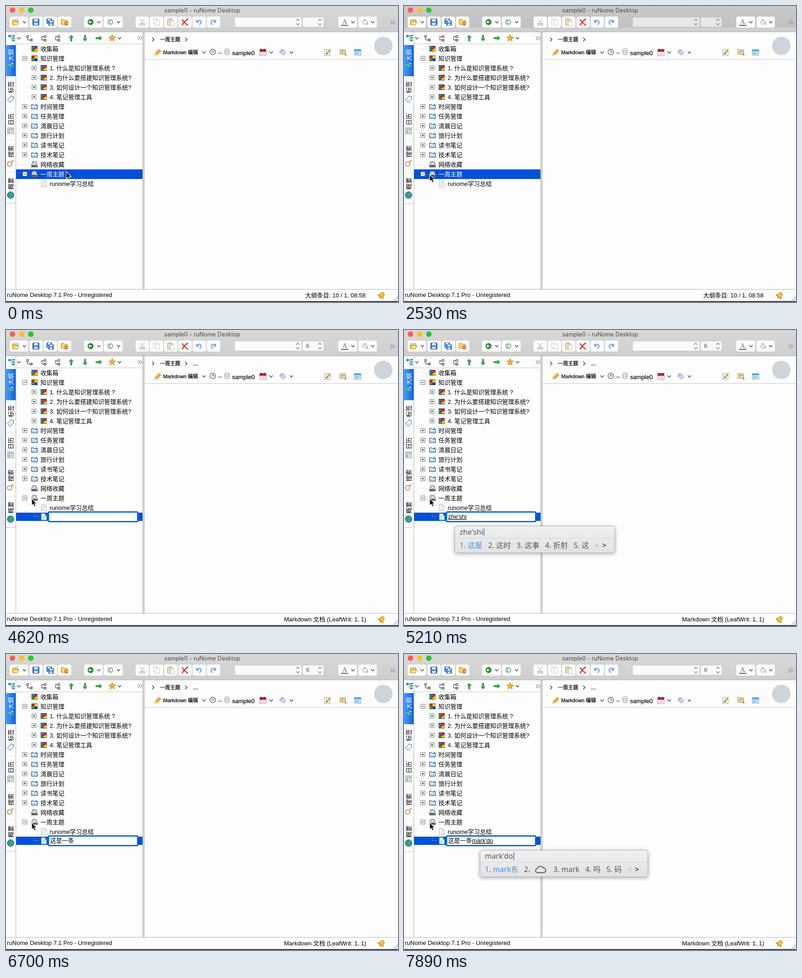
Animation, 853 px wide and 645 px high, one loop 8 s. Source, as an HTML page:

```html
<!DOCTYPE html>
<html lang="zh-CN">
<head>
<meta charset="utf-8">
<style>
html, body { margin: 0; width: 100%; height: 100%; overflow: hidden; background: #fdfdfd; }
svg { display: block; }
#stage { position: absolute; left: 0; top: 0; font: 13px "Liberation Sans", "Noto Sans CJK SC", "Noto Sans CJK", sans-serif; }
text { white-space: pre; }
.small { font-size: 11px; stroke: #000; stroke-width: .25px; }
#popup {
  position: absolute; top: 427px; height: 57px; padding: 0 18px 0 10px;
  border: 1px solid #b4b4b4; border-radius: 5px; background: linear-gradient(#f0f0f0, #e2e2e2);
  box-shadow: 0 2px 8px rgba(0,0,0,.32); white-space: pre; color: #555;
  font: 16px "Noto Sans", "Noto Sans CJK SC", "Noto Sans CJK", sans-serif;
}
#spelling { height: 25px; line-height: 25px; margin: 0 -18px 0 -10px; padding-left: 10px; border-bottom: 1px solid #d6d6d6; }
#spelling::after { content: ""; display: inline-block; width: 1.5px; height: 17px; margin-left: 1px; background: #4a97e8; vertical-align: -3px; }
#choices { display: flex; gap: 12.4px; height: 30px; line-height: 30px; }
#choices span:first-child { color: #3e90e2; }
#choices svg { display: inline-block; vertical-align: -4px; }
#choices .prev { color: #aaa; margin-right: -5.4px; }
#choices .next { color: #111; }
</style>
</head>
<body>
<svg id="stage" width="853" height="645" viewBox="0 0 853 645"></svg>
<div id="popup"><div id="spelling"></div><div id="choices"></div></div>
<script>
const LOOP = 8000;
const BLUE = '#0450d9';

const at = (x, y, inner) => `<g transform="translate(${x} ${y})">${inner}</g>`;
const rect = (x, y, w, h, fill, more = '') => `<rect x="${x}" y="${y}" width="${w}" height="${h}" fill="${fill}" ${more}/>`;
const circle = (x, y, r, fill, more = '') => `<circle cx="${x}" cy="${y}" r="${r}" fill="${fill}" ${more}/>`;
const shape = (d, fill, more = '') => `<path d="${d}" fill="${fill}" ${more}/>`;
const line = (d, color, width = 1, more = '') =>
  `<path d="${d}" fill="none" stroke="${color}" stroke-width="${width}" ${more}/>`;
const text = (x, y, str, more = '') => `<text x="${x}" y="${y}" ${more}>${str}</text>`;
const down = (x, y, color = '#555') => line(`M${x - 3.5} ${y - 2}l3.5 4 3.5-4`, color, 1.5);
const right = (x, y) => line(`M${x - 2} ${y - 4}l4 4-4 4`, '#444', 1.5);
const more = (x, y) => line(`M${x} ${y - 4}l4 4-4 4M${x + 5} ${y - 4}l4 4-4 4`, '#888', 1.2);
const button = (x, w) => rect(x, 23, w, 24, '#fcfcfc', 'rx="4"');

// Icons, each centred on 0,0
const icon = {
  quad: at(0, 0, rect(-6.5, -6, 13, 12, '#123') + rect(-6, -5, 6, 5, '#18f') + rect(0, -5, 6, 5, '#e22')
    + rect(-6, 0, 6, 5, '#1a2') + rect(0, 0, 6, 5, '#fd1') + rect(-3, -2, 5, 4, '#d11')),
  bright: rect(-6.5, -6, 13, 12, '#222') + rect(-6, -5, 6, 5, '#f11') + rect(0, -5, 6, 5, '#fe1')
    + rect(-6, 0, 6, 5, '#1b2') + rect(0, 0, 6, 5, '#23f'),
  folder: shape('M-6.5 5.5v-10h4l2 2h7v8z', '#b7d3f3', 'stroke="#24445f"') + line('M-6-.5h12', '#fff', 1.5)
    + line('M4-6v5M1.5-3.5h5M2.5-5l3 3m0-3l-3 3', '#1695dd', .9),
  disk: shape('M-4.5-6h8l3 8v4h-13v-4z', '#d8dbe0', 'stroke="#6b6f76"') + rect(-6, 2, 12, 3.5, '#4b5057')
    + circle(0, -2, 2.7, '#f4f6f8', 'stroke="#8a9099"') + circle(4, 4, .8, '#8f8'),
  page: shape('M-5-7h7l4 4v10h-11z', '#fff', 'stroke="#a9a9a9"') + line('M2-7v4h4M-3-2h6M-3 1h6M-3 4h6', '#bbb', .9),
  newPage: shape('M-5-7h7l4 4v10h-11z', '#f4fbff', 'stroke="#7aa9da"') + line('M-3-1h6M-3 2h6M-3 5h4', '#7ab', .9)
    + line('M4-6v5M1.5-3.5h5', '#1aa6c8', 1.2),
  open: shape('M-7 6v-11h5l1.5 2h5v3', '#ffd65c', 'stroke="#b98208"') + shape('M-7 6l3-7h11l-3 7z', '#ffe48b', 'stroke="#b98208"')
    + rect(0, -6, 5, 4, '#cfe3fa', 'stroke="#68a" stroke-width=".7"'),
  save: rect(-7, -7, 14, 14, '#3d7fdc', 'rx="1.5" stroke="#1c4c9e"') + rect(-4, -6.5, 8, 5, '#eef5ff') + rect(-4, 1.5, 8, 5, '#cfe2fb'),
  removeFolder: shape('M-7 5v-11h5l1.5 2h7v9z', '#ffd65c', 'stroke="#b98208"') + circle(4, 3, 4, '#e8541f') + rect(1.5, 2.2, 5, 1.6, '#fff'),
  calendar: rect(-7, -6, 14, 13, '#fff', 'stroke="#999"') + rect(-7, -7, 14, 6, '#c4252f')
    + line('M-4-8v4M4-8v4', '#511', 1.2) + line('M-5 1.5h10M-5 4.5h10', '#c66', 1.2, 'stroke-dasharray="2 1"'),
  tag: shape('M-6-2l3-4h4l6 7-5 5-8-6z', '#d9d4f5', 'stroke="#8d80c4"') + circle(-2, -3, 1.2, '#fff', 'stroke="#8d80c4"'),
  pencil: shape('M-7 6l2-5 8-8 4 4-8 8z', '#f6a526', 'stroke="#9b5a0c" stroke-width=".8"') + shape('M-7 6l2-5 3 4z', '#f6dfb4')
    + line('M-4 2L4-6', '#ffd88a', 1.2),
  clock: circle(0, 0, 6.2, '#e9edf3', 'stroke="#79808c" stroke-width="1.6"') + line('M0-4v4h3.5', '#445', 1.2),
  database: shape('M-5-5v10q5 3 10 0v-10z', '#e4e6e8', 'stroke="#92979b"')
    + '<ellipse cy="-5" rx="5" ry="2" fill="#fafafa" stroke="#92979b"/>' + line('M-5 0q5 3 10 0', '#b0b4b8'),
  edit: rect(-7, -6, 12, 13, '#fff', 'stroke="#999"') + line('M-5-3h7M-5 0h4M-5 3h8', '#9bb', .9)
    + line('M-2 3l8-9', '#e9971e', 3) + shape('M-4 5l1-4 3 2.5z', '#553'),
  find: rect(-7, -6, 13, 10, '#ffe092', 'stroke="#c79323"') + rect(-5, -4, 9, 4, '#9cc6f3')
    + circle(2, 1, 3.6, '#d6ebff', 'stroke="#d08a28" stroke-width="1.3"') + line('M4.5 4l3 3', '#c5711c', 2),
  pane: rect(-7, -6, 14, 12, '#f6fbff', 'stroke="#4292d3"') + rect(-7, -6, 14, 3.5, '#47a0e7')
    + line('M-5 0h5M-5 3h8', '#58a', 1.3) + rect(2, -1, 3, 2, '#4ac35b'),
  bell: at(0, 0, `<g transform="rotate(38)">${shape('M-7 5q3-2 3-7a4 4 0 0 1 8 0q0 5 3 7z', '#ffc52e', 'stroke="#a9700a"')
    + circle(0, 6, 2, '#d98a10')}</g>`),
  globe: circle(0, 0, 7.3, '#3c95dd', 'stroke="#165083"') + shape('M-6-2q3-5 6-4l1 4-4 3 1 5q-4-2-4-8zM2 1l4-3q2 5-3 7z', '#35a443')
};
const put = (name, x, y) => at(x, y, icon[name]);

function titleBar() {
  const undo = 'M-5-5v5h5M-5 0q4-6 8-3 4 4-2 9';
  const curve = (x, flip) => `<g transform="translate(${x} 35) scale(${flip} 1)">${line(undo, '#6f9fe0', 2.2)}</g>`;
  const round = (x, color, way) => circle(x, 35, 6.5, color) + line(`M${x + 3.5 * way} 35h${-7 * way}m${3 * way}-3l${-3 * way} 3 ${3 * way} 3`, '#fff', 1.6);
  const stepper = x => line(`M${x - 3.5} 32l3.5-3.5 3.5 3.5M${x - 3.5} 38l3.5 3.5 3.5-3.5`, '#777', 1.3);
  return rect(0, 0, 853, 57, 'url(#bar)')
    + rect(498, 25, 145, 20, '#fafafa', 'rx="3"') + rect(646, 25, 45, 20, '#fafafa', 'rx="3"')
    + rect(0, 0, 853, 47, '#000', 'id="dim" opacity=".07"')
    + stepper(635) + stepper(683)
    + circle(14, 9, 6, '#fc5b57') + circle(34, 9, 6, '#fdbc2e') + circle(54, 9, 6, '#28c231')
    + text(427, 14, 'sample0 - ruNome Desktop', 'text-anchor="middle" fill="#4a4a4a" style="font:12.7px Inter,sans-serif"')
    + [[8, 40], [51, 29], [82, 29], [113, 29], [170, 41], [213, 41], [282, 29], [313, 29], [344, 29],
      [375, 29], [406, 29], [437, 29], [723, 41], [767, 40]].map(b => button(...b)).join('')
    + put('open', 21, 35) + down(40, 35) + put('save', 65, 35)
    + `<g transform="translate(94 33) scale(.78)">${icon.save}</g><g transform="translate(98 37) scale(.78)">${icon.save}</g>`
    + put('removeFolder', 127, 35)
    + round(184, '#218a2a', 1) + down(202, 35) + round(227, '#9ac79c', -1) + down(245, 35)
    + line('M292 28l6 10M301 28l-6 10', '#a8bfdc', 1.4) + circle(293, 40, 2.3, 'none', 'stroke="#9db8dc" stroke-width="1.4"')
    + circle(300, 40, 2.3, 'none', 'stroke="#9db8dc" stroke-width="1.4"')
    + rect(321, 28, 8, 11, '#fff', 'stroke="#c4c4c4"') + rect(326, 31, 8, 11, '#fff', 'stroke="#c4c4c4"')
    + rect(351, 29, 12, 13, '#efd9b0', 'rx="1" stroke="#c5a77b"') + rect(354, 27, 6, 3, '#bbb') + rect(358, 33, 8, 10, '#fff', 'stroke="#bbb"')
    + line('M383 29q5 8 13 13M396 28q-8 5-13 14', '#e02020', 2.3)
    + curve(420, 1) + curve(451, -1)
    + text(737, 39, 'A', 'text-anchor="middle" fill="#777" style="font:15px Liberation Serif,serif"') + rect(729, 41, 16, 2.5, '#777') + down(755, 35)
    + shape('M775 35l6-6 6 6-6 6z', '#eee', 'stroke="#999"') + line('M779 28l3 5', '#999') + shape('M786 36q4 4 1 5-3-1-1-5z', '#9ab') + down(798, 35)
    + more(837, 36) + rect(0, 56, 853, 1, '#b0b0b0');
}

function sideTabs() {
  const label = (y, str, fill) => `<text transform="translate(14.5 ${y}) rotate(-90)" text-anchor="middle" fill="${fill}">${str}</text>`;
  return line('M21.5 57V617', '#b5b5b5') + line('M0 430.5h17q4 0 4-4', '#c4c4c4')
    + [222, 292, 362].map(y => line(`M0 ${y}.5h21`, '#e6e6e6')).join('')
    + rect(0, 85, 21, 68, 'url(#tab)')
    + ['大纲', '标签', '日历', '搜索', '概要'].map((s, i) => label(107 + 70 * i, s, i ? '#000' : '#fff')).join('')
    + rect(3, 126, 4, 4, '#3ad13a') + rect(11, 124, 5, 3, '#8df') + rect(11, 130, 5, 3, '#3ad13a') + line('M7 128h3v4', '#cef')
    + shape('M3 204l8-8 5 1 1 5-8 8z', '#e8f4ff', 'stroke="#456"')
    + rect(3.5, 265.5, 13, 13, '#fff', 'stroke="#4b8ed0"') + rect(5, 267, 4, 4, '#f2a43a') + rect(10, 267, 5, 4, '#7ab7ee')
    + rect(5, 272, 4, 5, '#7ab7ee') + rect(10, 272, 5, 5, '#ffd36b')
    + circle(8, 344, 5, '#f2f8ff', 'stroke="#c77b2a" stroke-width="1.5"') + line('M12 340l4-4', '#d98725', 2.4)
    + put('globe', 10, 412);
}

function treeTools() {
  const branch = x => line(`M${x + 3} 66v8h5M${x + 3} 67h5`, '#222')
    + rect(x + 8, 64.5, 4, 4, '#fff', 'stroke="#222"') + rect(x + 8, 72.5, 4, 4, '#9e9', 'stroke="#222"');
  const arrow = (x, angle) => `<g transform="translate(${x} 70) rotate(${angle})">${shape('M0-6.5l4.5 5h-3v8h-3v-8h-3z', '#2fb344', 'stroke="#137a28" stroke-width=".8"')}</g>`;
  const star = Array.from({ length: 10 }, (_, i) => {
    const r = i % 2 ? 3.4 : 7.8, a = i * Math.PI / 5;
    return `${231 + r * Math.sin(a)},${70 - r * Math.cos(a)}`;
  }).join(' ');
  return rect(5, 63, 5, 5, '#2d8ae2') + line('M10 65h4M12 65v10h2M12 70h2', '#678')
    + [63, 68, 73].map((y, i) => rect(14, y, 5, 3.5, i % 2 ? '#31b34a' : '#2d8ae2')).join('') + down(28, 70)
    + rect(45, 64.5, 4, 4, '#fff', 'stroke="#222"') + line('M47 69v5h6', '#222') + rect(53, 72, 4, 4, '#9e9', 'stroke="#222"')
    + branch(75) + branch(105) + arrow(142, 0) + arrow(172, 180) + arrow(202, 90)
    + `<polygon points="${star}" fill="#fcb51d" stroke="#c77b08"/>` + down(247, 70) + more(287, 70)
    + rect(22, 82, 275, 1, '#c8c8c8');
}

const ROWS = [
  [0, 'quad', '', '收集箱'], [0, 'bright', '-', '知识管理'],
  [1, 'quad', '+', '1. 什么是知识管理系统 ?'], [1, 'quad', '+', '2. 为什么要搭建知识管理系统?'],
  [1, 'quad', '+', '3. 如何设计一个知识管理系统?'], [1, 'quad', '+', '4. 笔记管理工具'],
  ...['时间管理', '任务管理', '清晨日记', '旅行计划', '读书笔记', '技术笔记'].map(s => [0, 'folder', '+', s]),
  [0, 'disk', '', '网络收藏'], [0, 'disk', '-', '一周主题'], [1, 'page', '', 'runome学习总结']
];

function tree() {
  const dots = (x, y, n, color) => line(`M${x} ${y}h${n}`, color, 1, 'stroke-dasharray="1 2"');
  return rect(22, 356, 275, 21, BLUE, 'id="rowMark"') + ROWS.map(([level, kind, box, label], i) => {
    const x = 41 + 20 * level, y = 93 + 21 * i;
    const expander = box
      ? rect(x - 4.5, y - 4.5, 9, 9, '#fff', 'stroke="#777"') + line(`M${x - 2.5} ${y}h5` + (box == '+' ? `M${x} ${y - 2.5}v5` : ''), '#111')
        + dots(x + 6, y + .5, 5, '#bbb')
      : dots(x, y + .5, 12, '#bbb');
    return expander + put(kind, x + 21, y) + text(x + 34, y + 5, label, i == 13 ? 'id="topic"' : '');
  }).join('')
    + `<g id="newRow">${rect(22, 398, 275, 18, BLUE)}${line('M61.5 399v8M61 406.5h11', '#cde', 1, 'stroke-dasharray="1 2"')}
      ${put('newPage', 82, 407)}${rect(92.5, 396.5, 194, 21, '#fff', 'rx="2" stroke="#0f69ea" stroke-width="3"')}
      <text x="96" y="411"><tspan id="typed"></tspan><tspan id="raw" text-decoration="underline"></tspan></text>
      ${rect(96, 400, 1, 14, '#000', 'id="caret"')}</g>`;
}

function content() {
  return rect(297, 57, 5, 560, '#d2d2d2') + rect(297, 57, 1, 560, '#b9b9b9')
    + right(320, 73) + text(335, 77, '一周主题', 'class="small"') + right(392, 73) + text(406.5, 77, '....', 'id="crumb" class="small"')
    + put('pencil', 330, 101) + text(342, 105, 'Markdown 编辑', 'class="small"') + down(431, 101)
    + put('clock', 450, 100) + text(461.5, 106, '--') + put('database', 481, 100) + text(492, 107, 'sample0', 'stroke="#000" stroke-width=".2"')
    + put('calendar', 559, 101) + down(577, 101) + put('tag', 602, 101) + down(621, 101)
    + put('edit', 700, 101) + put('find', 733, 101) + put('pane', 765, 101)
    + circle(821, 87, 20, '#cbd5db') + rect(302, 116, 551, 1, '#c6c6c6');
}

function statusBar() {
  return rect(0, 617, 853, 1, '#b5b5b5') + text(2, 634, 'ruNome Desktop 7.1 Pro - Unregistered')
    + text(0, 635, '', 'id="status"') + put('bell', 818, 630)
    + line('M843 642l10-10M847 642l6-6', '#888') + rect(0, 643, 853, 2, '#333');
}

const $ = id => document.getElementById(id);
$('stage').innerHTML = `<defs>
  <linearGradient id="bar" x2="0" y2="1"><stop stop-color="#d8d8d8"/><stop offset="1" stop-color="#cfcfcf"/></linearGradient>
  <linearGradient id="tab"><stop stop-color="#4a9bf8"/><stop offset="1" stop-color="#0c62e6"/></linearGradient></defs>`
  + rect(0, 57, 853, 588, '#fdfdfd') + titleBar() + sideTabs() + treeTools() + tree() + content() + statusBar()
  + text(653, 39, '6', 'id="size" fill="#555"')
  + `<g id="pointer">${shape('M0 0v15l3.5-3.2 2.5 5.7 2.7-1.2-2.5-5.5h4.8z', '#000', 'stroke="#fff" stroke-width="1.1"')}</g>`;

const HAND = `<svg width="20" height="16">${shape('M1 6q0-2 2-2h6l2-2q2-1 2 1l-1 2h6q2 1 0 2.500h-6l1 1-1 5h-6q-4 0-5-4z', '#f6c9a3', 'stroke="#d99a6c" stroke-width=".8"')}</svg>`
  .replace('M1 6', 'M1 6');
const CLOUD = `<svg width="34" height="18">${line('M12 15.500a4.500 4.500 0 0 1-.5-9 6.500 6.500 0 0 1 12-1.500 5 5 0 0 1 1.500 10.500z', '#555', 1.9)}</svg>`;

// Time, committed text, spelling, candidates
const TYPING = [
  [3270, '', ''],
  [4770, '', 'z', '在 这 再 中 做'],
  [4920, '', 'zh', '这 中 只 着 找'],
  [5060, '', "zhe's", '这是 这时 这事 折射 这'],
  [5210, '', "zhe'shi", '这是 这时 这事 折射 这'],
  [5660, '这是', ''],
  [5800, '这是', 'y', ['有', '右', HAND, '由', '也']],
  [5950, '这是', 'yi', '一 以 已 亿 意'],
  [6100, '这是', "yi't", '一天 一条 一套 一团 一'],
  [6250, '这是', "yi'tia", '一天 一条 一跳 一贴 一'],
  [6400, '这是', "yi'tiao", '一条 一跳 一挑 已调 一'],
  [6700, '这是一条', ''],
  [7150, '这是一条', 'm', '吗 没 买 卖 每'],
  [7300, '这是一条', 'ma', '吗 马 妈 嘛 码'],
  [7450, '这是一条', 'mar', 'mar 马 吗 mark 码'],
  [7600, '这是一条', 'mark', 'mark market marked marks 吗'],
  [7740, '这是一条', "mark'd", 'mark的 mark mark都 吗 码'],
  [7890, '这是一条', "mark'do", ['mark东', CLOUD, 'mark', '吗', '码']]
];
const POPUP_LEFT = { 0: 110, 2: 135, 4: 165 };
const MOVES = [290, 440, 590, 740, 880];
let shown;

function showTyping(step) {
  if (step === shown) return;
  shown = step;
  const [, done, raw, options] = step;
  $('typed').textContent = done;
  $('raw').textContent = raw;
  $('popup').style.display = raw ? 'block' : 'none';
  if (!raw) return;
  $('popup').style.left = POPUP_LEFT[done.length] + 'px';
  $('spelling').textContent = raw;
  const list = Array.isArray(options) ? options : options.split(' ');
  $('choices').innerHTML = list.map((s, i) => `<span>${i + 1}. ${s}</span>`).join('')
    + '<span class="prev">&lt;</span><span class="next">&gt;</span>';
}

function render(t) {
  const editing = t >= 3270;
  const show = (id, on) => $(id).setAttribute('visibility', on ? 'visible' : 'hidden');
  show('dim', t >= 2530 && t < 2680);
  show('rowMark', !editing);
  $('topic').setAttribute('fill', editing ? '#000' : '#fff');
  for (const id of ['crumb', 'size']) show(id, editing);
  $('newRow').style.display = editing ? '' : 'none';
  show('caret', t < 3720 || (t >= 4170 && t < 4620));
  $('status').setAttribute('x', editing ? 605 : 651);
  $('status').textContent = editing ? 'Markdown 文档 (LeafWrit: 1, 1)' : '大纲条目: 10 / 1, 08:58';

  const p = MOVES.filter(m => m <= t).length / MOVES.length;
  const eased = p * p * (3 - 2 * p);
  $('pointer').setAttribute('transform', `translate(${131 - 75 * eased} ${361 + 6.5 * eased})`);

  showTyping(TYPING.filter(s => s[0] <= t).pop() || [0, '', '']);
}

function tick() {
  render(performance.now() % LOOP);
  requestAnimationFrame(tick);
}
tick();
</script>
</body>
</html>
```
